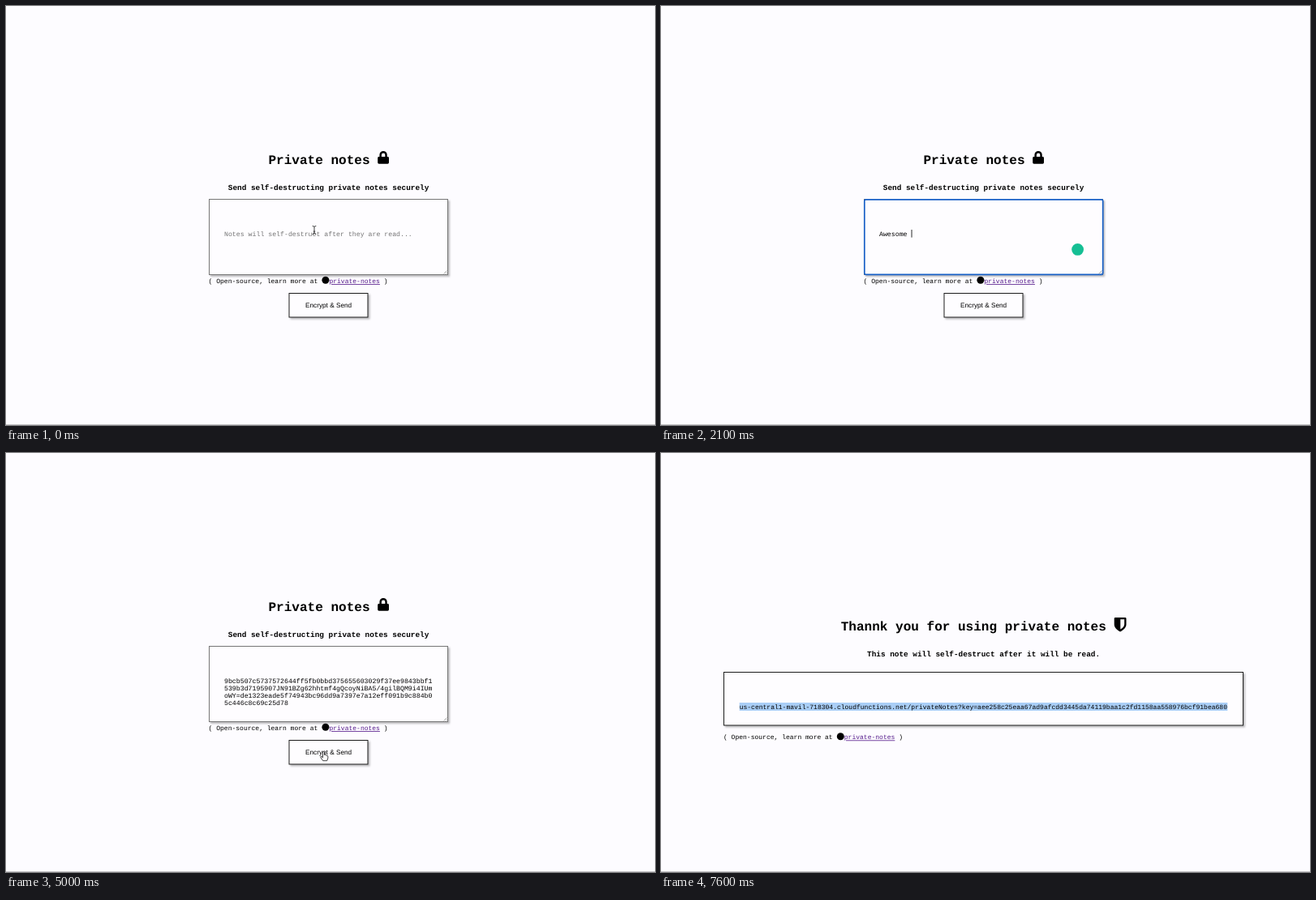
Animation of 800x517 px, one loop 8 s. Source, as an HTML page:

```html
<!DOCTYPE html>
<html lang="en">
<head>
<meta charset="utf-8">
<title>Private notes</title>
<style>
  html, body { margin: 0; width: 100%; height: 100%; overflow: hidden; background: #fdfcff; }
  svg { display: block; width: 100vw; height: 100vh; }
  text { font: 8.02px "Liberation Mono", monospace; white-space: pre; text-rendering: geometricPrecision; }
  .title { font-size: 16.05px; font-weight: bold; }
  .sub { font-size: 9.385px; font-weight: bold; }
  .note { font-size: 8.23px; }
  .hint { fill: #757575; }
  .label { font: 8.23px "Liberation Sans", Arial, sans-serif; }
  .link { fill: #551a8b; text-decoration: underline; }
  .box { fill: #fefdff; stroke: #1c1c1c; filter: drop-shadow(2px 2px 1px #0004); }
  .cursor { fill: #fff; stroke: #111; stroke-width: .8; stroke-linejoin: round; }
</style>
</head>
<body>
<svg viewBox="0 0 800 517">
  <defs>
    <g id="about">
      <text>( Open-source, learn more at </text>
      <circle cx="144.3" cy="-3.7" r="4.5"/>
      <text x="148.8" class="link">private-notes</text>
      <text x="211.4"> )</text>
    </g>
  </defs>
  <path d="M0 516.5H800" stroke="#c6c5c8"/>

  <g id="compose">
    <text x="323.5" y="194.5" class="title">Private notes</text>
    <path transform="translate(458.2 179) scale(.0308)" d="M400 224h-24v-72a152 152 0 0 0-304 0v72H48a48 48 0 0 0-48 48v192a48 48 0 0 0 48 48h352a48 48 0 0 0 48-48V272a48 48 0 0 0-48-48zm-104 0H152v-72a72 72 0 0 1 144 0z"/>
    <text x="273.8" y="227" class="sub">Send self-destructing private notes securely</text>
    <rect x="250.5" y="238.5" width="294" height="93" class="box" style="stroke:#767676"/>
    <path d="M539.5 330.5l4-4M542 330.5l1.5-1.5" stroke="#888" stroke-width=".7"/>
    <rect id="ring" x="250.8" y="238.8" width="293.9" height="92.6" rx="1.6" fill="none" stroke="#1860c6" stroke-width="1.7"/>
    <text id="hint" x="269" y="283.5" class="note hint">Notes will self-destruct after they are read...</text>
    <text id="typed" x="269" y="283.5" class="note"></text>
    <path id="caret" d="M.5 276v9.6" stroke="#111" stroke-width=".9"/>
    <g id="cipher"></g>
    <g id="badge">
      <circle cx="513.6" cy="300.4" r="7.4" fill="#15bf94"/>
      <path id="spin" d="M509.3 299a4.5 4.5 0 0 1 8.6 0" fill="none" stroke="#c9f2e6" stroke-width="1.1"/>
    </g>
    <use href="#about" x="249.6" y="342"/>
    <rect x="349" y="354.5" width="97" height="29.5" class="box"/>
    <text x="369" y="372.3" class="label">Encrypt &amp; Send</text>
  </g>

  <g id="thanks">
    <text x="221.7" y="219" class="title">Thannk you for using private notes</text>
    <path fill-rule="evenodd" d="M560 203h12.2q1.3 0 1.3 1.3v7.2c0 4-3.4 7-7.4 8.9c-4-1.9-7.4-4.9-7.4-8.9v-7.2q0-1.3 1.3-1.3zM566.3 205.3v12.3c3-1.7 4.9-3.7 4.9-6.3v-6z"/>
    <text x="254.1" y="250.7" class="sub">This note will self-destruct after it will be read.</text>
    <rect x="77.5" y="270.5" width="640" height="65.5" class="box"/>
    <rect id="mark" y="308" height="10" fill="#a9cef6"/>
    <text x="96.7" y="315.7">us-central1-mavil-718304.cloudfunctions.net/privateNotes?key=aee258c25eaa67ad9afcdd3445da74119baa1c2fd1158aa558976bcf91bea680</text>
    <use href="#about" x="77" y="353.4"/>
  </g>

  <g id="mouse" class="cursor">
    <path id="beam" fill="none" d="M-2.3-5Q0-5 0-3.8Q0-5 2.3-5M0-3.8V3.8M-2.3 5Q0 5 0 3.8Q0 5 2.3 5M-1.2 1.6H1.2"/>
    <path id="arrow" fill="#111" stroke="#fff" d="M0 0V9.3L2.2 7.3L3.7 10.6L5.3 9.9L3.9 6.7H6.8Z"/>
    <path id="hand" d="M-1 .6Q0-.7 1 .6V4Q2 3.3 2.6 4.4Q3.6 3.9 4 5Q5.3 4.6 5.3 6V8.2L4.2 11.2H-.8L-3.6 7.2Q-3.9 5.7-2.5 6L-1 7.4Z"/>
  </g>
</svg>
<script>
const LOOP = 8000, STEP = 100, FOCUS = 300, TYPE = 1200, KEY = 120, BLUR = 4700, SENT = 5400;
const NOTE = "Awesome secret note", NOTE_CHAR = 4.94, URL_CHAR = 4.813;
const CIPHER = [
  "9bcb507c5737572644ff5fb0bbd375655603029f37ee9843bbf1",
  "539b3d7195907JN91BZg62hhtmf4gQcoyNiBA5/4gilBQM9i4IUm",
  "oWY=de1323eade5f74943bc96dd9a7397e7a12eff091b9c884b0",
  "5c446c8c69c25d78"
];
// time, x, y of the pointer
const PATH = [
  [0, 380, 276.5], [FOCUS, 379, 278.5], [3700, 379, 278.5], [4300, 391.5, 331.5],
  [4600, 391.5, 368.5], [SENT, 391.5, 368.5], [6300, 376, 313.5], [LOOP, 376, 313.5]
];

const $ = id => document.getElementById(id);
const show = (id, on) => $(id).style.display = on ? "" : "none";

$("cipher").innerHTML = CIPHER.map((line, i) =>
  `<text x="269" y="${283.5 + i * 9.26}" class="note">${line}</text>`).join("");

function pointerAt(t) {
  const i = PATH.findIndex(p => p[0] > t);
  const [t0, x0, y0] = PATH[i - 1], [t1, x1, y1] = PATH[i];
  const k = (t - t0) / (t1 - t0), e = k * k * (3 - 2 * k);
  return [x0 + (x1 - x0) * e, y0 + (y1 - y0) * e];
}

function drawCompose(t) {
  const focused = t >= FOCUS && t < BLUR;
  const count = Math.max(0, Math.min(NOTE.length, Math.floor((t - TYPE) / KEY) + 1));
  const lastKey = count ? TYPE + (count - 1) * KEY : FOCUS;
  const sealed = t >= BLUR + 100;
  show("ring", focused);
  show("hint", !count);
  show("typed", !sealed);
  show("cipher", sealed);
  show("badge", count && focused);
  show("spin", t >= 3500);
  show("caret", focused && (t - lastKey) % 1000 < 500);
  $("typed").textContent = NOTE.slice(0, count);
  $("caret").setAttribute("transform", `translate(${269 + count * NOTE_CHAR})`);
  $("spin").setAttribute("transform", `rotate(${(t - 4300) * .36} 513.6 300.4)`);
}

function drawMark(t) {
  const [from, length] = t < 6700 ? [0, 0] : t < 6800 ? [57, 3] : [0, 125];
  $("mark").setAttribute("x", 96.7 + from * URL_CHAR);
  $("mark").setAttribute("width", length * URL_CHAR);
}

function drawMouse(t) {
  const [x, y] = pointerAt(t), sent = t >= SENT;
  const beam = sent ? y < 318 : y < 331;
  const hand = !sent && y >= 354;
  show("beam", beam);
  show("hand", hand);
  show("arrow", !beam && !hand);
  show("mouse", !(t >= TYPE && t < 3700) && t < 7300);
  $("mouse").setAttribute("transform", `translate(${x} ${y})`);
}

function frame(now) {
  const t = Math.floor(now % LOOP / STEP) * STEP;
  show("compose", t < SENT);
  show("thanks", t >= SENT);
  drawCompose(t);
  drawMark(t);
  drawMouse(t);
  requestAnimationFrame(frame);
}
frame(0);
</script>
</body>
</html>
```
